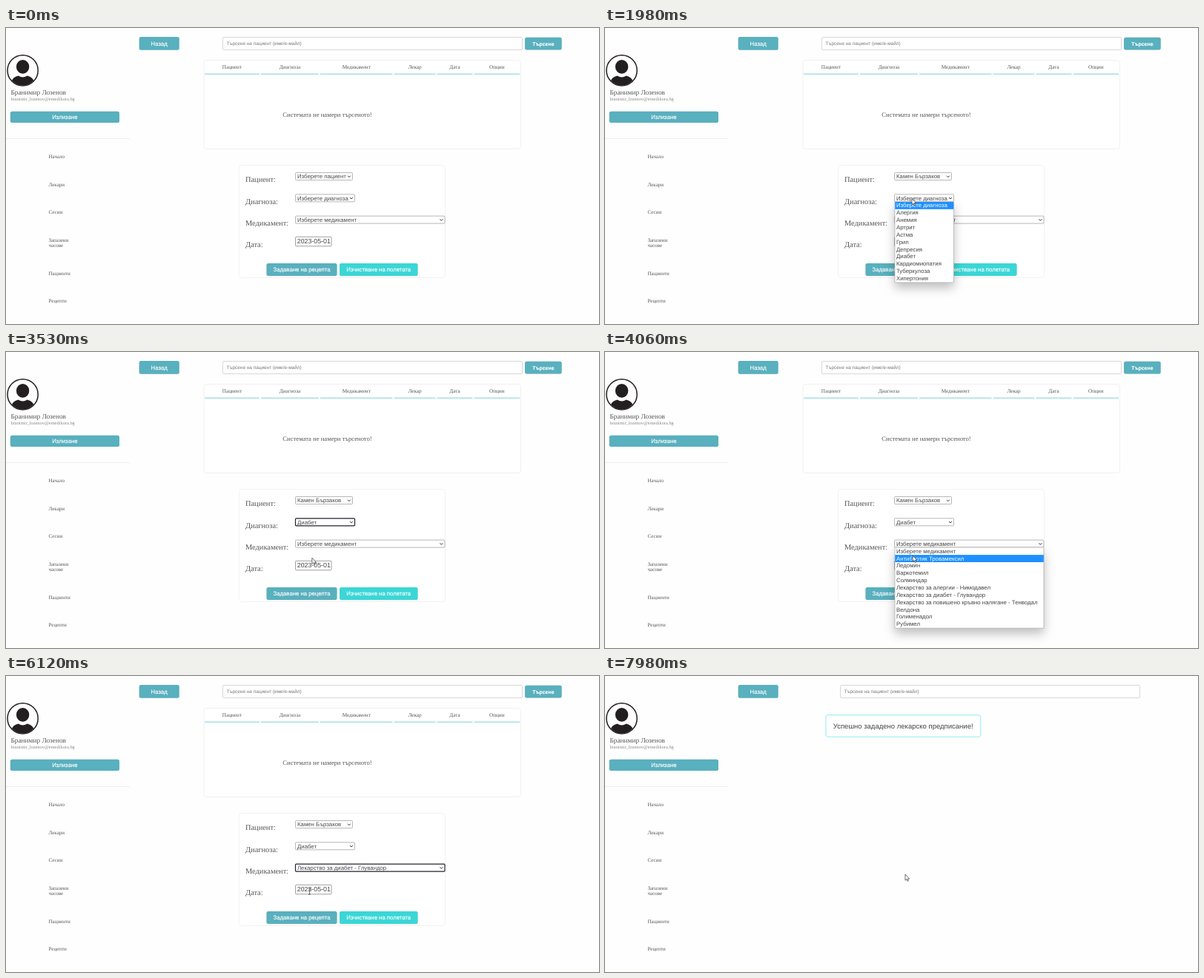
These frames come from a looping animation (800x400 px, 8 s). An HTML page:

```html
<!DOCTYPE html>
<html lang="bg">
<head>
<meta charset="utf-8">
<style>
  html, body { margin: 0; width: 100%; height: 100%; overflow: hidden; background: #fefefe; }
  svg { display: block; width: 800px; height: 400px; }
  text { font-family: "Liberation Sans", Arial, sans-serif; text-rendering: geometricPrecision; }
  .serif { font-family: "Liberation Serif", "Times New Roman", serif; }
  .mid { text-anchor: middle; }
  .bold { font-weight: bold; }
  .label { stroke: #fff; stroke-width: .15; }
  .popup { filter: drop-shadow(0 7px 7px rgba(0, 0, 0, .25)); }
  .button { filter: drop-shadow(0 .6px .7px rgba(0, 0, 0, .16)); }
</style>
</head>
<body>
<svg viewBox="0 0 800 400">
  <g id="sidebar"></g>
  <g id="page"></g>
  <g id="cursor" fill="#fff" stroke="#333" stroke-width=".7" stroke-linejoin="round">
    <path id="arrow" d="M0 0V8.2L1.9 6.5L3.2 9.3L4.4 8.8L3.2 6.1H5.7Z"/>
    <path id="beam" d="M-1.5 -4H1.5M0 -4V4M-1.5 4H1.5"/>
    <path id="hand" d="M-.6 0Q.3 -.8 1 0V3.2L4.2 4V7L3.4 9H-.4L-2.6 5.3L-1.9 4.6L-.6 5.6Z"/>
  </g>
</svg>
<script>
const LOOP = 8000, SENT = 6720, ROW = 9.85, PITCH = 29.3, FIELD_X = 390.5, TEAL = '#59b0be';
const $ = id => document.getElementById(id);

const rect = (x, y, w, h, fill, stroke = 'none', r = 0, extra = '') =>
  `<rect x="${x}" y="${y}" width="${w}" height="${h}" rx="${r}" fill="${fill}" stroke="${stroke}" ${extra}/>`;
const text = (x, y, str, size, fill = '#555', cls = '') =>
  `<text x="${x}" y="${y}" font-size="${size}" fill="${fill}" class="${cls}">${str}</text>`;
const serif = (x, y, str, size, fill, cls = '') => text(x, y, str, size, fill, 'serif ' + cls);
const button = (x, y, w, h, str, size = 7.75, fill = TEAL, cls = '') =>
  rect(x, y, w, h, fill, 'none', 2.5, 'class="button"') +
  text(x + w / 2, y + h / 2 + size * .36, str, size, '#fff', 'mid label ' + cls);

const selects = [
  { w: 77, open: 980, close: 1510, pick: 1, items: [
    'Изберете пациент', 'Камен Бързаков', 'Милена Дъбова', 'Огнян Росалиев'] },
  { w: 80, open: 1850, close: 3250, pick: 7, items: [
    'Изберете диагноза', 'Алергия', 'Анемия', 'Артрит', 'Астма', 'Грип', 'Депресия',
    'Диабет', 'Кардиомиопатия', 'Туберкулоза', 'Хипертония'] },
  { w: 201.5, open: 3700, close: 5720, pick: 6, items: [
    'Изберете медикамент', 'Антибиотик Тровамексил', 'Ледомин', 'Варкотемил', 'Солминдар',
    'Лекарство за алергии - Нимодавел', 'Лекарство за диабет - Глувандор',
    'Лекарство за повишено кръвно налягане - Тенводал', 'Велдона', 'Голименадол', 'Рубимел'] }
];
selects.forEach((s, i) => {
  s.y = 195.5 + i * PITCH;
  s.blur = selects[i + 1]?.open ?? LOOP;
});

// Pointer moves: departure, arrival, x, y; it rests in between
const moves = [
  [120, 910, 398, 204], [980, 1400, 408, 220], [1520, 1780, 414, 230.5],
  [2380, 2840, 409, 300], [2840, 3180, 411, 307], [3250, 3700, 414, 261],
  [3860, 4530, 418, 308], [4860, 5600, 421, 326], [5720, 6120, 409.5, 291],
  [6120, 6520, 381, 326], [6990, 7450, 405, 271], [7590, 7790, 405, 268]
];
function pointer(t) {
  let x = 790, y = 410;
  for (const [from, to, toX, toY] of moves) {
    const k = Math.max(0, Math.min(1, (t - from) / (to - from)));
    x += (toX - x) * k;
    y += (toY - y) * k;
  }
  return [x, y];
}

function selectBox(s, t) {
  const focused = t >= s.close && t < s.blur, right = FIELD_X + s.w;
  return rect(FIELD_X, s.y, s.w, 10, '#fff', focused ? '#223' : '#999', 1, `stroke-width="${focused ? 1.2 : .7}"`) +
    text(393, s.y + 7.8, s.items[t >= s.close ? s.pick : 0], 7.8, '#4a4a4a') +
    `<path d="M${right - 6.5} ${s.y + 4.2}l1.9 2l1.9 -2" fill="none" stroke="#333"/>`;
}

function popup(s, y) {
  const top = s.y + 10, n = s.items.length;
  const hover = Math.max(0, Math.min(n - 1, Math.floor((y - top) / ROW)));
  return rect(391, top, s.w - .5, n * ROW + .8, '#fff', '#aaa', 1, 'stroke-width=".7" class="popup"') +
    rect(391.3, top + hover * ROW + .2, s.w - 1, ROW, '#1e90ff') +
    s.items.map((item, i) =>
      text(393, top + i * ROW + 7.6, item, 7.8, i === hover ? '#fff' : '#444')).join('');
}

const search = x => rect(x, 12.5, 404, 17, '#fff', '#d8d8d8', 1.5) +
  text(x + 5, 23.1, 'Търсене на пациент (име/е-майл)', 6.45, '#777');

function table() {
  const columns = { Пациент: 74, Диагноза: 78, Медикамент: 97.5, Лекар: 56, Дата: 48, Опции: 61.5 };
  let x = 268, head = '';
  for (const [name, w] of Object.entries(columns)) {
    head += serif(x + w / 2, 55.3, name, 7.2, '#555', 'mid') + rect(x, 61.5, w, 1.5, '#a6dfe9');
    x += w + 2;
  }
  return rect(267, 43.5, 427.5, 120, '#fff', '#f0f0f0', 4) + head +
    serif(433.5, 120, 'Системата не намери търсеното!', 8.67, '#555', 'mid');
}

function form(t) {
  const labels = ['Пациент:', 'Диагноза:', 'Медикамент:', 'Дата:'];
  return rect(314.5, 185.5, 278, 152, '#fff', '#f2f2f2', 4) +
    labels.map((s, i) => serif(323, 208.4 + i * PITCH, s, 10.4)).join('') +
    selects.map(s => selectBox(s, t)).join('') +
    rect(FIELD_X, 282.3, 48.5, 12.5, '#fff', '#888', 1, 'stroke-width=".8"') +
    text(392.8, 291.3, '2023-05-01', 8.8, '#444') +
    button(351.5, 318, 95, 17, 'Задаване на рецепта') +
    button(450, 318, 105.5, 17, 'Изчистване на полетата', 7.75, '#3bd6d6');
}

function page(t, y) {
  if (t >= SENT) return search(317.5) + rect(298, 52.7, 208.8, 29.5, '#fff', '#8eeeee', 3) +
    text(402.2, 70.8, 'Успешно зададено лекарско предписание!', 9.53, '#444', 'mid');
  const opened = selects.find(s => t >= s.open && t < s.close);
  return search(292.5) + button(700, 12.7, 49.7, 16.7, 'Търсене', 6.95, TEAL, 'bold') +
    table() + form(t) + (opened ? popup(opened, y) : '');
}

function sidebar() {
  let y = 176, menu = '';
  for (const entry of ['Начало', 'Лекари', 'Сесии', 'Запазени|часове', 'Пациенти', 'Рецепти']) {
    const lines = entry.split('|');
    lines.forEach((line, i) => menu += serif(57.5, y + i * 7.8, line, 7.03));
    y += 37.5 + (lines.length - 1) * 7.8;
  }
  return `<clipPath id="disc"><circle r="20"/></clipPath>
    <g transform="translate(22.6 57.4)" fill="#231f20">
      <g clip-path="url(#disc)"><ellipse cy="-5" rx="8.7" ry="9.3"/>
      <path d="M-15 22V15Q-14 9 -6 7Q0 11 6 7Q14 9 15 15V22Z"/></g>
      <circle r="20.6" fill="none" stroke="#231f20" stroke-width="1.5"/>
    </g>` +
    serif(6.5, 89.6, 'Бранимир Лозенов', 9.3) +
    serif(6.5, 98, 'branimir_lozenov@emedikora.bg', 6.4, '#888') +
    button(5.8, 112.8, 147.2, 15.3, 'Излизане') + button(179.7, 12, 54, 17.7, 'Назад') +
    rect(0, 149, 167, 1, '#eee') + menu;
}

function cursorKind(t, y) {
  if (t < 5800 || t >= SENT) return 'arrow';
  return y > 318 ? 'hand' : y > 282 && y < 295 ? 'beam' : 'arrow';
}

let shown = '';
function draw(now) {
  const t = Math.max(0, now - start) % LOOP, [x, y] = pointer(t);
  const markup = page(t, y), kind = cursorKind(t, y);
  if (markup !== shown) $('page').innerHTML = shown = markup;
  for (const id of ['arrow', 'beam', 'hand']) $(id).style.display = id === kind ? '' : 'none';
  $('cursor').setAttribute('transform', `translate(${x} ${y})`);
  requestAnimationFrame(draw);
}

$('sidebar').innerHTML = sidebar();
const start = performance.now();
draw(start);
</script>
</body>
</html>
```
